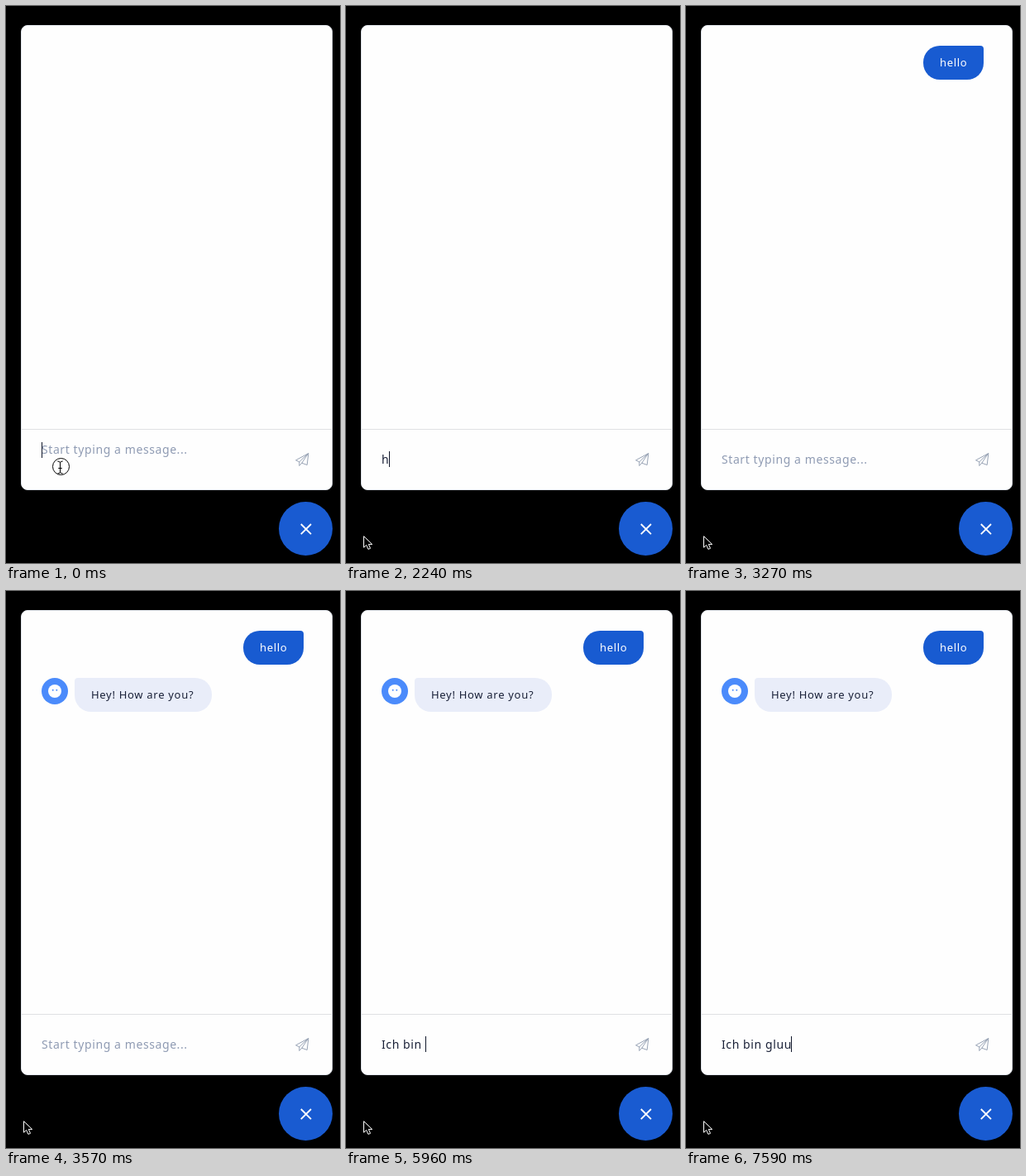
These frames come from a looping animation (404 by 673 pixels, 8 s). An HTML page:

```html
<!DOCTYPE html>
<html lang="en">
<head>
<meta charset="utf-8">
<title>Chat widget</title>
<style>
  html, body { margin: 0; width: 100%; height: 100%; overflow: hidden; background: #000; }
  #stage { position: relative; width: 404px; height: 673px; overflow: hidden; background: #000;
    font-family: "Noto Sans", "Open Sans", sans-serif; white-space: pre; }
  #stage > * { position: absolute; }
  .panel { left: 18px; top: 23px; width: 377px; height: 562px; box-sizing: border-box;
    border: 1px solid #dfe3ea; border-radius: 8px; background: #fefefe; }
  .rule { left: 19px; top: 511px; width: 375px; height: 1px; background: #e0e1e3; }
  .bubble { height: 41px; padding-left: 20px; box-sizing: border-box;
    font-size: 13px; line-height: 41px; letter-spacing: .7px; }
  #sent { left: 287px; top: 48px; width: 73px; border-radius: 20px 4px 20px 20px;
    background: #185bd1; color: #fff; }
  #reply { left: 83px; top: 105px; width: 166px; border-radius: 4px 20px 20px 20px;
    background: #e9edf9; color: #1a2138; }
  #field { left: 43px; font-size: 14px; line-height: 19px; letter-spacing: .59px; }
  #caret { width: 1px; height: 19px; background: #10162a; }
  svg { left: 0; top: 0; }
</style>
</head>
<body>
<div id="stage">
  <div class="panel"></div>
  <div class="rule"></div>
  <div class="bubble" id="sent">hello</div>
  <div class="bubble" id="reply">Hey! How are you?</div>
  <span id="field"></span>
  <div id="caret"></div>
  <svg width="404" height="673" fill="none">
    <g id="avatar">
      <circle cx="59" cy="121" r="16" fill="#4b8bfb"/>
      <circle cx="59" cy="121" r="8" fill="#fefefe"/>
      <circle cx="56.7" cy="119.8" r="1" fill="#4b8bfb"/>
      <circle cx="61.3" cy="119.8" r="1" fill="#4b8bfb"/>
    </g>
    <path stroke="#98a3b5" stroke-linejoin="round" stroke-linecap="round"
      d="M365.5 540.7L350.5 548.8L354.8 550.8V555.5L357.8 552.2L363.8 554.4ZM354.8 550.8L365.5 540.7L357.8 552.2"/>
    <circle cx="362.5" cy="631.5" r="32.5" fill="#195bd1"/>
    <path stroke="#fff" stroke-width="1.9" d="M356.8 626L369 638.2M369 626L356.8 638.2"/>
    <g id="beam" stroke="#000">
      <circle cx="66.5" cy="556.5" r="10" fill="#fff"/>
      <path d="M62.3 550Q65.5 550 65.5 552Q65.5 550 68.7 550M65.5 552V563M62.3 565Q65.5 565 65.5 563Q65.5 565 68.7 565M63.3 558.5H67.7"/>
    </g>
    <path id="arrow" fill="#000" stroke="#fff" d="M.5 .7V14.2L3.6 11.3L5.9 16.4L8.5 15.3L6.3 10.4H10.7Z"/>
  </svg>
</div>
<script>
const LOOP = 8000;
const HINT = "Start typing a message...";
const $ = id => document.getElementById(id);

// start time, typed text, caret visible
const typing = [
  [0, "", 1], [440, "", 0], [890, "", 1], [1340, "", 0], [1790, "", 1],
  [2240, "h", 1], [2390, "he", 1], [2530, "hell", 1], [2680, "hello", 1],
  [2970, "", 1], [3270, "", 0], [3720, "", 1], [4170, "", 0],
  [4770, "I", 1], [4920, "Ic", 1], [5060, "Ich", 1], [5210, "Ich ", 1],
  [5510, "Ich bi", 1], [5660, "Ich bin", 1], [5960, "Ich bin ", 1],
  [6250, "Ich bin gl", 1], [6700, "Ich bin glu", 1], [6850, "Ich bin gluu", 1],
  [7450, "Ich bin glu", 1], [7590, "Ich bin gluu", 1]
];

// start time, pointer tip
const pointer = [[150, 50, 588], [290, 28, 628], [440, 21, 640]];

const SENT_AT = 2970, REPLY_AT = 3570, FIRST_KEY = 2240;

const at = (steps, t) => steps.filter(s => s[0] <= t).pop();
const show = (id, on) => { $(id).style.visibility = on ? "visible" : "hidden"; };

function draw(t) {
  const [, text, caretOn] = at(typing, t);
  const top = t < FIRST_KEY ? 526 : 538;
  const field = $("field"), caret = $("caret");
  field.textContent = text || HINT;
  field.style.color = text ? "#1a2138" : "#8f9bb3";
  field.style.top = top + "px";
  const width = text ? field.getBoundingClientRect().width : 0;
  caret.style.left = 43 + Math.floor(width) + "px";
  caret.style.top = top + (text ? 0 : 1) + "px";
  show("caret", caretOn);

  show("sent", t >= SENT_AT);
  show("reply", t >= REPLY_AT);
  show("avatar", t >= REPLY_AT);

  const tip = at(pointer, t);
  show("beam", !tip);
  show("arrow", tip);
  if (tip) $("arrow").setAttribute("transform", `translate(${tip[1]} ${tip[2]})`);
}

const start = performance.now();
function tick() {
  draw((performance.now() - start) % LOOP);
  requestAnimationFrame(tick);
}
tick();
</script>
</body>
</html>
```
